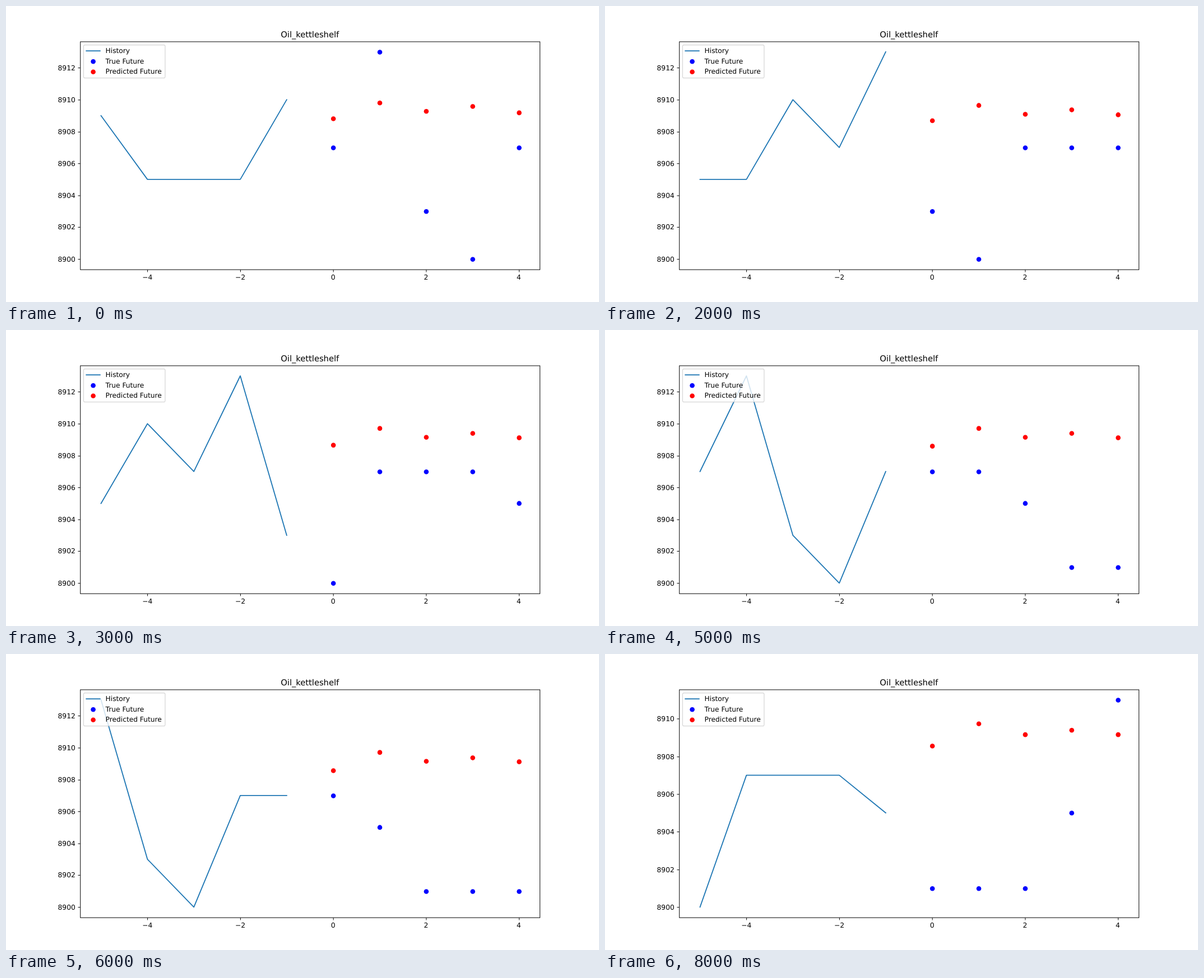
Animation, 1058 px wide and 529 px high, one loop 9000 ms. Source, as an HTML page:

```html
<!DOCTYPE html>
<html lang="en">
<head>
<meta charset="utf-8">
<title>Forecast</title>
<style>
  html, body { margin: 0; width: 100%; height: 100%; overflow: hidden; background: #fff; }
  svg { display: block; width: 100vw; height: 100vh; }
  text { font: 13.89px "DejaVu Sans", sans-serif; text-rendering: geometricPrecision; }
  .title { font-size: 16.67px; }
  .mid { text-anchor: middle; }
  .end { text-anchor: end; }
  .axis { fill: none; stroke: #000; stroke-width: 1.11; }
  .history { fill: none; stroke: #1f77b4; stroke-width: 2.083; stroke-linecap: square; stroke-linejoin: round; }
</style>
</head>
<body>
<svg id="chart" viewBox="0 0 1200 600"></svg>
<script>
const STEP = 1000;
const STEPS = 9;
const WINDOW = 5;
const BASE = 8900;
const BOX = { left: 150, right: 1080, top: 72, bottom: 534 };

// Prices above BASE; the chart slides one value further each step.
const series = [9, 5, 5, 5, 10, 7, 13, 3, 0, 7, 7, 7, 5, 1, 1, 1, 5, 11];

// Each forecast settles at its level after a fading drift and a damped swing.
const forecasts = [
  { level: 8.54, drift: 0.27, swing: 0 },
  { level: 9.73, drift: -0.04, swing: 0.12 },
  { level: 9.16, drift: 0, swing: 0.12 },
  { level: 9.38, drift: 0.1, swing: 0.12 },
  { level: 9.165, drift: -0.09, swing: 0.12 }
];
const predict = (k, { level, drift, swing }) =>
  level + drift * Math.exp(-k / 3.5) + swing * Math.exp(-k / 2.5) * Math.cos(k * Math.PI / 2);

const svg = document.getElementById("chart");

function add(tag, attrs, parent = svg, label = "") {
  const el = document.createElementNS("http://www.w3.org/2000/svg", tag);
  for (const key in attrs) el.setAttribute(key, attrs[key]);
  el.textContent = label;
  return parent.appendChild(el);
}

const text = (x, y, label, cls = "", parent = svg) => add("text", { x, y, class: cls }, parent, label);
const dot = (cx, cy, fill, parent) => add("circle", { cx, cy, r: 4.86, fill }, parent);
const line = (d, cls, parent) => add("path", { d, class: cls }, parent);
const snap = v => Math.round(v) + 0.5;

const padX = (BOX.right - BOX.left) / 22;
const padY = (BOX.bottom - BOX.top) / 22;
const toX = v => BOX.left + padX + (v + WINDOW) * padX * 20 / 9;

const plot = add("g", {});

function drawAxes() {
  add("rect", {
    x: BOX.left + 0.5, y: BOX.top + 0.5,
    width: BOX.right - BOX.left, height: BOX.bottom - BOX.top, class: "axis"
  });
  for (let v = -4; v <= 4; v += 2) {
    line(`M${snap(toX(v))} ${BOX.bottom + 0.5}v4.86`, "axis");
    text(toX(v), 555, String(v).replace("-", "\u2212"), "mid");
  }
  text((BOX.left + BOX.right) / 2, 63.7, "Oil_kettleshelf", "title mid");
}

function drawLegend() {
  add("rect", {
    x: 157, y: 79, width: 165, height: 67, rx: 2.8,
    fill: "#fff", stroke: "#ccc", "stroke-width": 1.39, opacity: 0.8
  });
  line("M162.5 91h27.8", "history");
  dot(176.5, 112.5, "blue");
  dot(176.5, 133.5, "red");
  ["History", "True Future", "Predicted Future"].forEach((label, i) => text(201.4, 95.5 + i * 20.9, label));
}

function drawStep(k) {
  const past = series.slice(k, k + WINDOW);
  const future = series.slice(k + WINDOW, k + 2 * WINDOW);
  const guess = forecasts.map(f => predict(k, f));
  const max = Math.max(...past, ...future, ...guess);
  const toY = v => BOX.bottom - padY - v / max * padY * 20;

  plot.replaceChildren();
  for (let v = 0; v <= max * 1.05; v += 2) {
    line(`M${BOX.left + 0.5} ${snap(toY(v))}h-4.86`, "axis", plot);
    text(140.3, Math.round(toY(v) + 5), BASE + v, "end", plot);
  }
  const scatter = (values, color) =>
    values.forEach((v, i) => dot(snap(toX(i)), snap(toY(v)), color, plot));
  scatter(future, "blue");
  scatter(guess, "red");
  add("polyline", { points: past.map((v, i) => [toX(i - WINDOW), toY(v)]).join(" "), class: "history" }, plot);
}

let shown = -1;
function update(time) {
  const k = Math.floor(time / STEP) % STEPS;
  if (k !== shown) drawStep(shown = k);
}

drawAxes();
drawLegend();
update(0);

const start = performance.now();
function tick() {
  update(performance.now() - start);
  requestAnimationFrame(tick);
}
requestAnimationFrame(tick);
</script>
</body>
</html>
```
